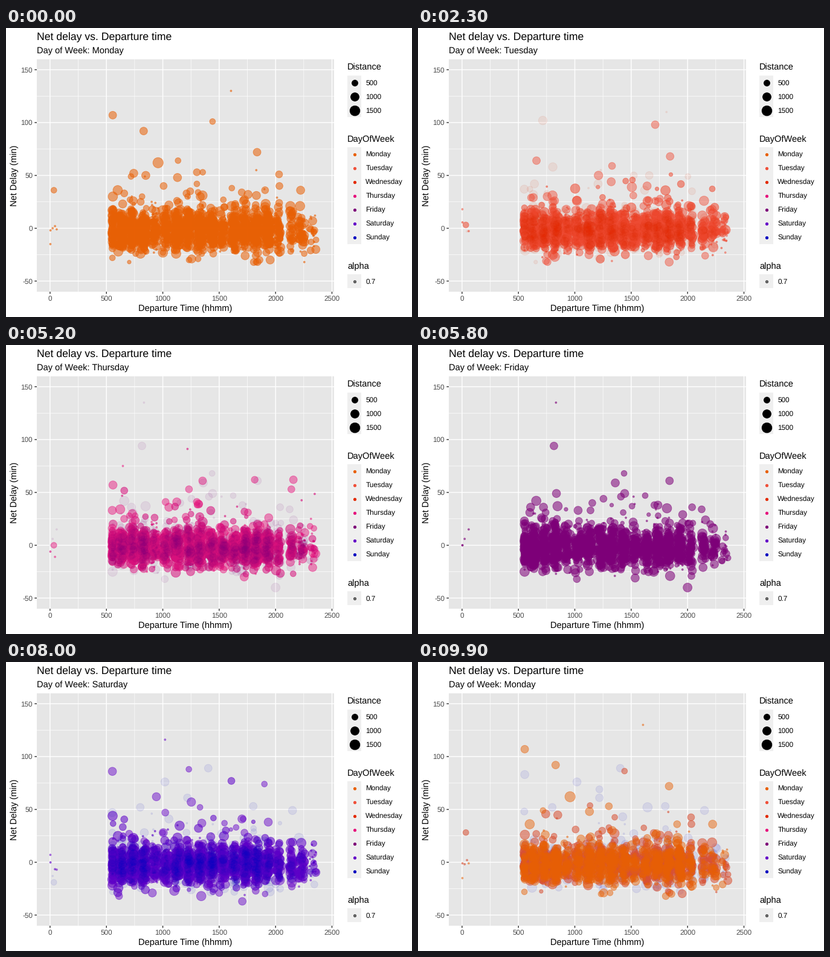
Animation of 672 by 480 pixels, one loop 10000 ms. Source, as a matplotlib script:

```python
import numpy as np
import matplotlib.pyplot as plt
from matplotlib.animation import FuncAnimation
from matplotlib.patches import Rectangle

plt.rcParams["font.family"] = "Liberation Sans"
plt.rcParams["text.hinting"] = "none"

W, H, DPI = 672, 480, 96
FRAMES, STEP_MS = 100, 100
DAYS = ["Monday", "Tuesday", "Wednesday", "Thursday", "Friday", "Saturday", "Sunday"]
COLORS = ["#E86005", "#F0503A", "#E32A00", "#E6147D", "#7D0078", "#6400C8", "#0000C0"]
STARTS = [8, 23, 38, 52, 66, 80, 94]  # first frame of each transition
STEPS = 7
ALPHA = 0.55
L, R, T, B = 51, 543, 52, 438  # panel edges

# The most striking flights of each day: time, delay, size
KEY_FLIGHTS = [
    [(556, 107, 4.5), (830, 92, 4.5), (958, 62, 6), (1605, 130, 1), (1836, 72, 4.5)],
    [(660, 64, 4.5), (1713, 98, 4.5), (1210, 50, 5), (1845, 68, 4.5)],
    [(716, 102, 5), (805, 58, 5), (1660, 50, 4.5), (1813, 110, 1)],
    [(622, 34, 5.4), (1353, 61, 4.5), (1815, 62, 4), (2158, 62, 4.5)],
    [(815, 94, 4.5), (833, 135, 1), (1840, 61, 4.5), (2000, -40, 5.2)],
    [(1020, 116, 1), (1253, 57, 5), (1705, -37, 4.5)],
    [(800, 52, 4.5), (1218, 61, 4.5), (1403, 89, 4.5), (1802, 53, 4.5)],
]


def px(t):
    return 72.9 + 0.18664 * np.asarray(t, float)


def py(d):
    return 332.6 - 1.755 * np.asarray(d, float)


def area(size):
    """Marker area in square points for a plot size in mm."""
    return (1.5 * 1.4225 * np.asarray(size, float)) ** 2


# Colour blending in CIE Lab
M = np.array([[0.4124, 0.3576, 0.1805], [0.2126, 0.7152, 0.0722], [0.0193, 0.1192, 0.9505]])
WHITE = M.sum(axis=1)


def to_lab(color):
    c = np.array([int(color[i:i + 2], 16) for i in (1, 3, 5)]) / 255
    lin = np.where(c > 0.04045, ((c + 0.055) / 1.055) ** 2.4, c / 12.92)
    q = M @ lin / WHITE
    f = np.where(q > 0.008856, np.cbrt(q), 7.787 * q + 16 / 116)
    return np.array([116 * f[1] - 16, 500 * (f[0] - f[1]), 200 * (f[1] - f[2])])


def to_rgb(lab):
    fy = (lab[0] + 16) / 116
    f = np.array([fy + lab[1] / 500, fy, fy - lab[2] / 200])
    q = np.where(f > 0.2069, f ** 3, (f - 16 / 116) / 7.787) * WHITE
    lin = np.clip(np.linalg.solve(M, q), 0, 1)
    return np.where(lin > 0.0031308, 1.055 * lin ** (1 / 2.4) - 0.055, 12.92 * lin)


LABS = [to_lab(c) for c in COLORS]


def make_flights(n=3200):
    """Positions, areas and one delay per day (NaN when the flight does not run)."""
    rng = np.random.default_rng(12)

    # Busy through the day with three waves, quiet late, nearly empty after midnight
    hours = np.r_[0, 5:24]
    weight = 14 + 3 * np.cos((hours - 7.5) * 2 * np.pi / 5.2)
    weight *= np.interp(hours, [0, 4, 5, 6, 19, 20, 21, 22, 23], [.06, .06, .7, 1, 1, .6, .4, .4, .16])
    hour = rng.choice(hours, n, p=weight / weight.sum())
    first = np.select([hour == 5, hour == 21], [52, 25], 0)
    last = np.where(hour == 20, 50, 60)
    time = hour * 100 + np.floor(first + rng.random(n) * (last - first))

    size = rng.choice([1, 2.2, 3.4, 4.1, 4.8, 5.5], n, p=[.2, .06, .18, .24, .22, .1])
    short = np.select([hour == 9, hour >= 22, hour == 0], [0.45, 0.4, 0.8], 0)
    size = np.where(rng.random(n) < short, 1, size)

    # A normal core with a long late tail, a short early tail and rare long delays
    shape = (n, 7)
    delay = rng.normal(-2.5, 9, shape)
    delay += (rng.random(shape) < 0.12) * rng.exponential(12, shape)
    delay -= (rng.random(shape) < 0.03) * rng.exponential(6, shape)
    delay += (rng.random(shape) < 0.005) * (25 + rng.exponential(22, shape))
    delay = np.clip(np.round(delay), -32, 125)
    delay[rng.random(shape) < 0.4] = np.nan

    for day, flights in enumerate(KEY_FLIGHTS):
        for t, d, s in flights:
            row = np.full(7, np.nan)
            row[day] = d
            time, size = np.append(time, t), np.append(size, s)
            delay = np.vstack([delay, row])
    return px(time), area(size), delay


X, AREA, DELAY = make_flights()

fig = plt.figure(figsize=(W / DPI, H / DPI), dpi=DPI, facecolor="white")
ax = fig.add_axes([0, 0, 1, 1])
ax.set(xlim=(0, W), ylim=(H, 0))
ax.axis("off")


def label(x, y, s, size=11, color="black", **kw):
    return ax.text(x, y, s, fontsize=size, color=color, va="baseline", **kw)


def box(x0, y0, x1, y1, color):
    ax.add_patch(Rectangle((x0, y0), x1 - x0, y1 - y0, fc=color, ec="none", zorder=0))


def line(xs, ys, width, color="white"):
    ax.plot(xs, ys, color=color, lw=width * 0.75, solid_capstyle="butt", snap=False, zorder=1)


def dots(x, y, s, color):
    return ax.scatter(x, y, s=s, c=color, edgecolors=color, linewidths=0.7, zorder=2)


def draw_panel():
    box(L, T, R, B, "#E6E6E6")
    for t in range(250, 2500, 500):
        line([px(t)] * 2, [T, B], 0.71)
    for d in range(-25, 150, 50):
        line([L, R], [py(d)] * 2, 0.71)
    for t in range(0, 2501, 500):
        line([px(t)] * 2, [T, B], 1.42)
        line([px(t)] * 2, [B, B + 3.67], 1.42, "#333333")
        label(px(t), 453.3, str(t), 8.8, "#4D4D4D", ha="center")
    for d in range(-50, 151, 50):
        line([L, R], [py(d)] * 2, 1.42)
        line([L - 3.67, L], [py(d)] * 2, 1.42, "#333333")
        label(44.2, py(d) + 4.2, str(d), 8.8, "#4D4D4D", ha="right")
    label(297, 470, "Departure Time (hhmm)", ha="center")
    label(18.3, 245, "Net Delay (min)", rotation=90, rotation_mode="anchor", ha="center")
    label(50.7, 19, "Net delay vs. Departure time", 13.2)


def draw_legend(title, top, names, sizes, colors):
    key = 23.04
    label(565, top - 9, title)
    box(565, top, 565 + key, top + key * len(names), "#EFEFEF")
    for i, (name, s, c) in enumerate(zip(names, sizes, colors)):
        y = top + key * (i + 0.5)
        dots([576.5], [y], area(s), [c])
        label(595.3, y + 4.2, name, 8.8)


draw_panel()
draw_legend("Distance", 79, ["500", "1000", "1500"], [3.5, 4.85, 5.8], ["black"] * 3)
draw_legend("DayOfWeek", 198, DAYS, [1.5] * 7, COLORS)
draw_legend("alpha", 409, ["0.7"], [1.5], [(0, 0, 0, ALPHA)])
subtitle = label(50.7, 42, "")
cloud = dots([], [], [], "black")


def state(frame):
    """Current day and progress towards the next one."""
    day, t = 0, 0
    for i, start in enumerate(STARTS):
        if frame >= start:
            day, t = i, (frame - start + 1) / STEPS
    return ((day + 1) % 7, 0) if t >= 1 else (day, t)


def update(frame):
    day, t = state(frame)
    nxt = (day + 1) % 7
    a, b = DELAY[:, day], DELAY[:, nxt]
    here, there = ~np.isnan(a), ~np.isnan(b)
    if t == 0:
        layers = [(here, a, LABS[day], ALPHA)]
    else:
        # Leaving flights fade out, shared ones glide, new ones fade in on top
        layers = [
            (here & ~there, a, LABS[day], ALPHA * (1 - t)),
            (here & there, a + (b - a) * t, LABS[day] * (1 - t) + LABS[nxt] * t, ALPHA),
            (there & ~here, b, LABS[nxt], ALPHA * t),
        ]
    xy = np.vstack([np.column_stack([X[m], py(y[m])]) for m, y, _, _ in layers])
    rgba = np.vstack([np.tile([*to_rgb(lab), al], (m.sum(), 1)) for m, _, lab, al in layers])
    cloud.set_offsets(xy)
    cloud.set_sizes(np.concatenate([AREA[m] for m, *_ in layers]), DPI)
    cloud.set_facecolor(rgba)
    cloud.set_edgecolor(rgba)
    subtitle.set_text("Day of Week: " + DAYS[nxt if t > 0.5 else day])
    return cloud, subtitle


anim = FuncAnimation(fig, update, frames=FRAMES, interval=STEP_MS,
                     repeat=True, repeat_delay=0, blit=False)
plt.show()
```
